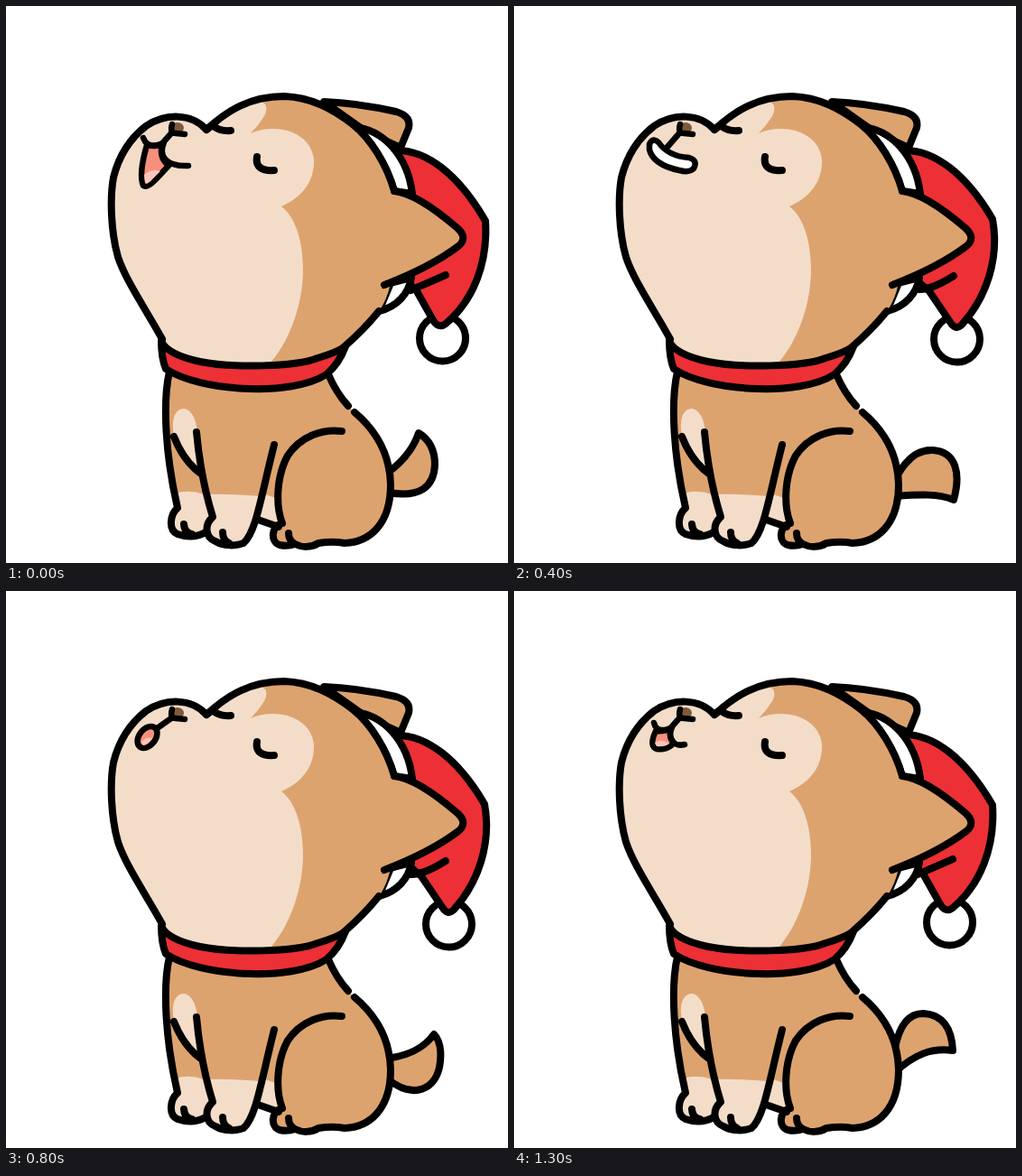
An HTML page that plays this animation: 556 by 617 pixels, repeating every 1.4 s.

```html
<!DOCTYPE html>
<html lang="en">
<head>
<meta charset="utf-8">
<title>Singing puppy</title>
<style>
html, body { margin: 0; width: 100%; height: 100%; overflow: hidden; background: #fff; }
svg { display: block; width: 100%; height: 100%; }
.ink { stroke: #000; stroke-width: 8; stroke-linecap: round; stroke-linejoin: round; }
.line { fill: none; }
.thin { stroke-width: 6.5; }
.tan { fill: #dda36f; }
.cream { fill: #f3ddc9; }
.red { fill: #ec3036; }
.white { fill: #fff; }
.pink { fill: #f6907d; }
.tongue { fill: #fac5ba; stroke: none; }

/* Every pose is held for 100 ms per step; --i is its first step. */
.wag, .sing { visibility: hidden; }
.wag { animation: one7 700ms step-end infinite; animation-delay: calc(var(--i) * 100ms - 700ms); }
.wag.two { animation-name: two7; }
.sing { animation: one14 1400ms step-end infinite; animation-delay: calc(var(--i) * 100ms - 1400ms); }
.sing.two { animation-name: two14; }
.sing.three { animation-name: three14; }
@keyframes one7 { 0% { visibility: visible; } 14.2857%, 100% { visibility: hidden; } }
@keyframes two7 { 0% { visibility: visible; } 28.5714%, 100% { visibility: hidden; } }
@keyframes one14 { 0% { visibility: visible; } 7.1428%, 100% { visibility: hidden; } }
@keyframes two14 { 0% { visibility: visible; } 14.2857%, 100% { visibility: hidden; } }
@keyframes three14 { 0% { visibility: visible; } 21.4285%, 100% { visibility: hidden; } }
</style>
</head>
<body>
<svg viewBox="0 0 556 617">
  <defs>
    <g id="hatLow" class="ink">
      <circle class="white" cx="483.500" cy="368" r="25.500"/>
      <path class="red" d="M430 160 C466 158 502 188 531 238 C534 284 518 326 487 352 Q479 358 473 348 L455 316 L430 290Z"/>
      <path class="line" d="M448 315 L487 298"/>
    </g>
    <g id="hatMid" class="ink">
      <circle class="white" cx="490.500" cy="369" r="25.500"/>
      <path class="red" d="M430 160 C466 158 502 188 530 236 C538 280 523 323 496 353 Q489 360 483 350 L460 316 L430 290Z"/>
      <path class="line" d="M449 314 Q463 314 487 299"/>
    </g>
  </defs>

  <!-- tail -->
  <g class="ink tan">
    <path class="wag" style="--i:0" d="M420 519 C440 505 451 491 457 473 Q475 484 475 508 C474 533 458 545 424 539"/>
    <path class="wag" style="--i:1" d="M420 518 C447 515 463 506 474 491 Q483 500 481 521 C478 553 451 564 422 540"/>
    <path class="wag" style="--i:2" d="M420 516 C440 527 468 524 482 507 C487 522 484 544 474 556 C461 570 440 567 420 551"/>
    <path class="wag" style="--i:3" d="M420 515 C440 534 468 538 487 521 C490 541 484 560 467 570 C451 577 434 572 418 560"/>
    <path class="wag" style="--i:4" d="M422 525 C434 501 449 491 464 492 C490 494 495 518 487 547 C470 540 450 541 422 543"/>
    <path class="wag" style="--i:5" d="M422 512 C428 485 441 470 457 471 C477 472 489 490 491 515 C468 513 448 518 422 530"/>
    <path class="wag" style="--i:6" d="M422 506 C427 481 437 468 453 468 C475 469 485 485 486 509 C462 506 444 513 422 533"/>
  </g>

  <!-- hat -->
  <use class="wag" style="--i:0" href="#hatLow"/>
  <use class="wag" style="--i:5" href="#hatLow"/>
  <use class="wag" style="--i:6" href="#hatLow" transform="translate(-1 -1)"/>
  <use class="wag" style="--i:1" href="#hatMid"/>
  <use class="wag" style="--i:4" href="#hatMid"/>
  <g class="wag two ink" style="--i:2">
    <circle class="white" cx="493" cy="369.500" r="25.500"/>
    <path class="red" d="M430 160 C466 158 502 188 529 234 C541 274 532 316 501 352 Q494 360 487 350 L462 316 L430 290Z"/>
    <path class="line" d="M450 314 Q464 316 487 300"/>
  </g>

  <!-- body -->
  <path class="tan" d="M181 400 C173 440 177 500 191 556 L230 570 L277 569 L306 573 C293 576 293 594 303 597 Q312 599 320 596 Q333 601 346 595 L375 595 C402 594 426 575 426 530 C425 490 405 466 386 450 L379 443 L357 405Z"/>
  <path class="cream" d="M186 476 C182 455 189 446 197 446 C206 447 212 460 212 475 L217 518 Q198 502 186 476Z"/>
  <path class="cream" d="M187 540 Q203 535 219 541 Q250 540 282 543 Q275 586 264 594 C252 600 240 601 232 593 L221 584 Q205 593 190 585 C179 578 183 564 191 556Z"/>
  <path class="cream" d="M287 541 L302 546 L304 574 L280 569Z"/>
  <g class="ink line">
    <path d="M181 405 C173 440 177 500 190 556 C181 564 180 581 190 585 Q207 591 221 583 M197 574 Q198 584 206 585"/>
    <path d="M186 477 Q197 505 217 519 M211 472 C214 505 221 540 229 566 C219 575 221 589 232 593 C242 599 255 598 263 595 C277 583 282 545 297 486 M240 583 Q240 592 247 595"/>
    <path d="M279 569 L302 577"/>
    <path d="M357 408 Q366 429 379 443 M386 450 C405 466 425 490 426 530 C426 575 402 594 375 595 C365 593 352 594 346 595 C338 600 328 600 320 596 Q312 599 303 597 C293 594 293 576 306 573 C298 552 300 520 312 498 C326 477 350 468 372 471 M313 584 Q313 592 320 596"/>
  </g>

  <!-- far ear and hat band -->
  <path class="ink tan" d="M352 106 C382 107 405 111 432 117 Q449 122 446 135 L437 157 L400 140Z"/>
  <path class="ink white" d="M386 134 C418 137 445 166 450 208 L430 205 C422 176 404 147 386 134Z"/>
  <path class="ink white" d="M426 307 L449 301 C446 318 434 333 413 338Z"/>

  <!-- head -->
  <path class="tan" d="M222 137 C245 116 270 100 308 100 C338 101 362 114 384 131 C404 147 422 176 430 205 L460 250 L426 307 Q422 326 413 338 Q397 358 375 377 L345 395 L215 396Z"/>
  <path class="cream" d="M173 369 C155 336 133 305 124 278 C116 250 115 212 119 190 C125 166 137 147 155 133 C176 119 205 118 222 137 C245 116 262 108 283 106 Q292 110 286 122 Q280 132 271 141 C297 129 338 138 341 170 C342 196 326 213 305 222 C323 236 329 265 329 295 C328 335 312 375 291 397 L215 396 L178 385Z"/>
  <path class="ink line" d="M173 369 C155 336 133 305 124 278 C116 250 115 212 119 190 C125 166 137 147 155 133 C176 119 205 118 222 137 C245 116 270 100 308 100 C338 101 362 114 384 131 C404 147 422 176 430 205"/>
  <path class="ink line" d="M413 338 Q397 358 374 378 M222 137 L231 130"/>
  <path class="ink tan" d="M430 205 C450 207 479 228 500 246 Q512 257 501 266 C480 282 450 297 419 309"/>

  <!-- collar -->
  <path class="ink red" d="M172 371 C176 381 192 389 215 394 C250 401 320 400 345 390 Q366 384 376 377 Q369 396 355 408 C335 421 300 425 270 424 C230 423 195 414 177 402 Q172 390 172 371Z"/>

  <!-- eyes and nose -->
  <path class="ink line" d="M278 167 C276 178 283 183 297 182 M231 134 Q238 139 249 138"/>
  <ellipse cx="190" cy="135" rx="7" ry="6" fill="#7d5a3c"/>
  <path class="ink line thin" d="M184 131 Q181 141 188 141 L198 142"/>

  <!-- mouth -->
  <g class="ink line thin">
    <g class="sing" style="--i:0">
      <path class="pink" d="M156 154 C150 175 148 190 152 199 Q156 202 165 193 L180 177 Q168 166 174 152 Q166 156 156 154Z"/>
      <path class="tongue" d="M153 187 Q161 180 171 183 L163 191 Q156 199 154 196Z"/>
      <path d="M152 146 Q155 155 165 155 Q173 154 175 150 L183 141 M175 151 C168 167 178 178 202 177"/>
    </g>
    <g class="sing three" style="--i:1">
      <path class="pink" d="M156 153 C149 175 142 192 147 203 Q152 209 162 200 Q178 187 186 172 Q169 166 174 152 Q166 156 156 153Z"/>
      <path class="tongue" d="M149 190 Q158 182 170 188 L160 198 Q152 205 149 201Z"/>
      <path d="M154 146 Q157 154 165 154 Q173 152 175 149 L183 141 M175 150 C167 162 174 173 200 172"/>
    </g>
    <g class="sing two" style="--i:4">
      <path class="white" d="M150 153 Q154 145 160 151 C167 161 178 167 194 168 Q204 171 199 180 Q194 185 183 182 C163 178 152 169 150 159Z"/>
      <path d="M183 141 L170 156"/>
    </g>
    <g class="sing two" style="--i:6">
      <path d="M183 141 L172 155"/>
      <ellipse class="pink" cx="163" cy="167.500" rx="11" ry="13.500" transform="rotate(15 163 167.500)"/>
      <path class="tongue" d="M155 172 Q163 167 170 171 Q165 178 160 178 Q156 177 155 172Z"/>
    </g>
    <g class="sing two" style="--i:8">
      <path d="M183 141 L166 153"/>
      <ellipse class="pink" cx="156.500" cy="162" rx="9" ry="13.500" transform="rotate(38 156.500 162)"/>
      <path class="tongue" d="M150 167 Q155 161 162 163 Q156 171 152 171Z"/>
    </g>
    <g class="sing three" style="--i:10">
      <path d="M183 141 L166 153"/>
      <ellipse class="pink" cx="156.500" cy="161" rx="8" ry="13.500" transform="rotate(44 156.500 161)"/>
      <path class="tongue" d="M149 167 Q153 157 163 157 Q158 168 151 169Z"/>
    </g>
    <g class="sing" style="--i:13">
      <path class="pink" d="M157 155 C150 170 153 177 165 175 Q173 174 177 168 Q171 162 174 152 Q166 156 157 155Z"/>
      <path class="tongue" d="M156 168 Q163 163 172 169 Q166 173 158 172Z"/>
      <path d="M155 146 Q157 155 166 154 Q173 153 175 150 L183 141 M175 151 C169 163 177 173 189 170"/>
    </g>
  </g>
</svg>
</body>
</html>
```
